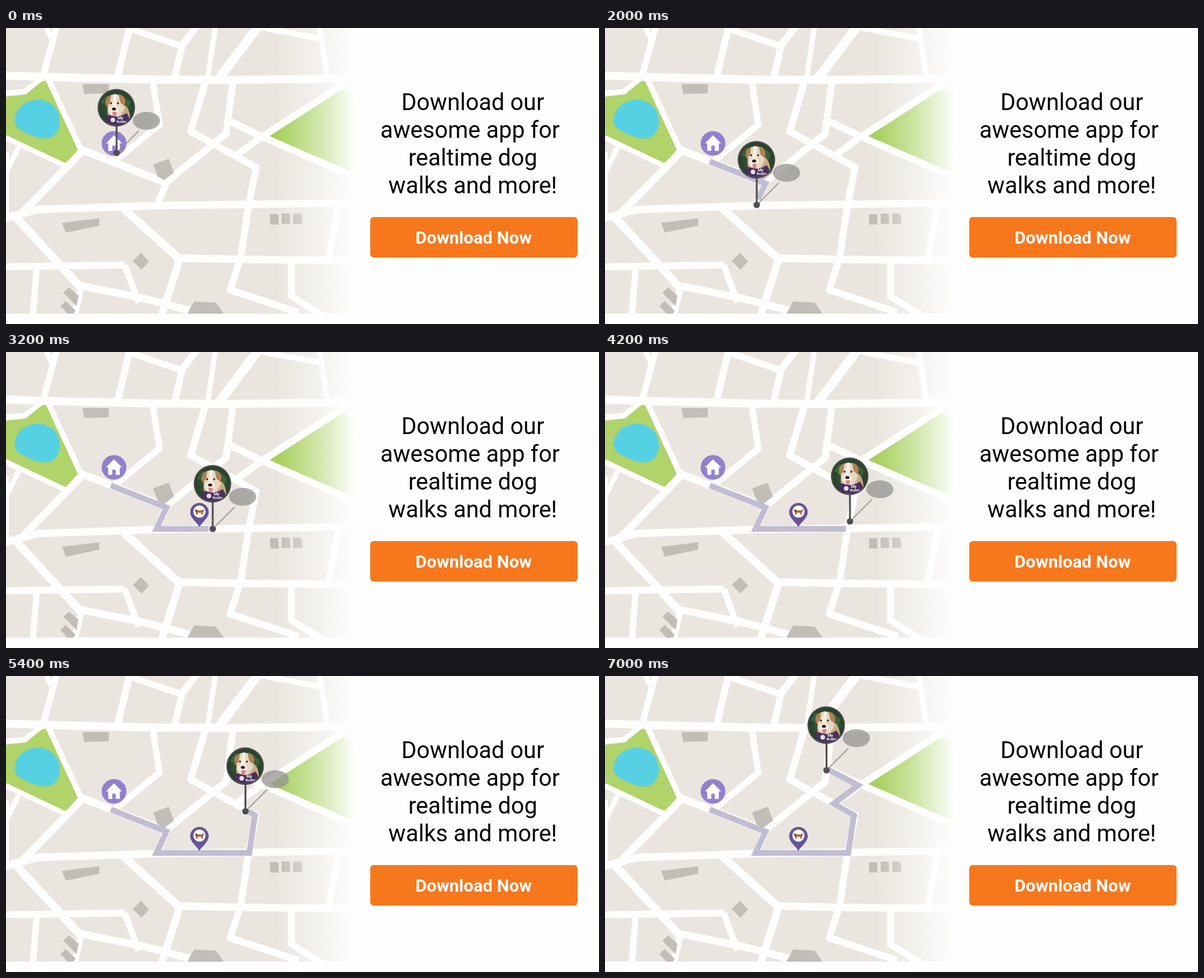
An HTML page for the animation above (7.2 s loop, 1024 by 512 pixels).

```html
<!DOCTYPE html>
<html lang="en">
<head>
<meta charset="utf-8">
<title>Dog walk map</title>
<style>
  html, body { margin: 0; width: 100%; height: 100%; overflow: hidden; background: #fefefe; }
  svg { display: block; width: 100vw; height: 100vh; }
  text { font-family: Roboto, Arial, sans-serif; text-anchor: middle; }
  .roads path { fill: none; stroke: #fefefe; stroke-linejoin: round; }
</style>
</head>
<body>
<svg viewBox="0 0 1024 512" xmlns="http://www.w3.org/2000/svg">
  <defs>
    <linearGradient id="fade" gradientUnits="userSpaceOnUse" x1="468" y1="0" x2="604" y2="0">
      <stop offset="0" stop-color="#fefefe" stop-opacity="0"/>
      <stop offset=".5" stop-color="#fefefe" stop-opacity=".46"/>
      <stop offset="1" stop-color="#fefefe"/>
    </linearGradient>
    <radialGradient id="leaves">
      <stop offset="0" stop-color="#4a6a3c"/>
      <stop offset="1" stop-color="#24402a"/>
    </radialGradient>
    <clipPath id="mapClip"><path d="M0 0H606V494H0Z"/></clipPath>
    <clipPath id="photoClip"><circle r="30"/></clipPath>
  </defs>
  <rect width="1024" height="512" fill="#fefefe"/>

  <g clip-path="url(#mapClip)">
    <rect width="606" height="494" fill="#eae6df"/>
    <path d="M0 119L35 115L62 91L74 92L125 209L104 235L0 185Z" fill="#b0d36a"/>
    <path d="M455 187L575 104L606 115V262Z" fill="#a6d05c"/>
    <path d="M54 124C76 123 93 140 93 160C93 180 82 191 68 191C54 191 38 184 25 176C14 170 12 157 19 144C26 131 40 124 54 124Z" fill="#56d1e3"/>
    <g class="roads" id="roads"></g>
    <g fill="#c1bdb7">
      <path d="M132 97H178L177 113L135 114Z"/>
      <path d="M254 236L281 226L290 250L273 263L262 257Z"/>
      <path d="M97 337L161 329V342L103 354Z"/>
      <path d="M219 403L233 389L247 404L234 418Z"/>
      <path d="M456 322H470L471 340H456ZM476 321H490L491 339H476ZM496 321H510L512 339H496Z"/>
      <path d="M99 458L109 449L125 463L122 481Z"/>
      <path d="M94 481L103 472L120 489L117 494H106Z"/>
      <path d="M313 494L325 473L362 475L376 494Z"/>
    </g>
    <rect x="460" width="146" height="494" fill="url(#fade)"/>
  </g>

  <path id="trail" d="M181 231L277 269L260 306H420L430 241L395 221L437 189L382 160" fill="none" stroke="#c0bdd3" stroke-width="10" stroke-miterlimit="6"/>

  <g transform="translate(186.5 199.5)">
    <circle r="21.3" fill="#9180d0"/>
    <path d="M0-14L14 0H10V13H3V4H-3V13H-10V0H-14Z" fill="#fff"/>
  </g>

  <g id="stop" transform="translate(334 277)">
    <path d="M0 26C-3 18-16 11-16 0A16 16 0 0 1 16 0C16 11 3 18 0 26Z" fill="#68529a"/>
    <circle r="10.5" cy="-1" fill="#fff"/>
    <path d="M-8-3L-6-5L-3-3H4L7-5L8-2L6 0V4H3V1H-3V4H-6V0Z" fill="#b06a35"/>
    <path d="M-6-4L-3-3L-4 0L-7-1Z" fill="#733f24"/>
  </g>

  <g id="pin">
    <g opacity=".76">
      <path d="M0 0L38-38" stroke="#8c8a89" stroke-width="2.2"/>
      <ellipse cx="51.5" cy="-55.5" rx="23.5" ry="15.5" fill="#969594"/>
    </g>
    <path d="M0 0V-48" stroke="#4f4f50" stroke-width="3.2"/>
    <circle r="5.6" fill="#4f4f50"/>
    <g transform="translate(-.5 -78)">
      <circle r="32.4" fill="#484a48"/>
      <g clip-path="url(#photoClip)">
        <circle r="30" fill="url(#leaves)"/>
        <path d="M-27-9L-18-22L-10-17L-18-4ZM15-18L25-10L20 2Z" fill="#3d6138"/>
        <path d="M8-8C20-5 25 7 24 30H-16L-15 5Z" fill="#c9ac82"/>
        <path d="M-15-16C-12-25 6-26 12-17L14 2L6 15L-7 17L-15 6Z" fill="#e5d8c1"/>
        <path d="M-9-22C-19-20-20-10-17-2L-11-8ZM4-23C15-22 18-12 14-3L7-9Z" fill="#ad8256"/>
        <path d="M-4-24L1-23L-1-4L-5-2L-7-6Z" fill="#f6efe2"/>
        <ellipse cx="-4" cy="4" rx="8" ry="8" fill="#f3ebdf"/>
        <circle cx="-9" cy="-8" r="1.7" fill="#35271d"/>
        <circle cx="3" cy="-8" r="1.7" fill="#35271d"/>
        <ellipse cx="-4" cy="2" rx="3.5" ry="2.6" fill="#241d1c"/>
        <path d="M-7 7H1L-1 14Q-4 17-6 13Z" fill="#df7e84"/>
        <path d="M-19 11L-7 14Q4 18 18 9L25 22L14 32H-15Z" fill="#49305f"/>
        <circle cx="-6" cy="21" r="4" fill="#e6ddea"/>
        <text x="7" y="20" font-size="7" font-weight="700" fill="#fff">My</text>
        <text x="9" y="26" font-size="6" font-weight="700" fill="#fff">Buddy</text>
      </g>
    </g>
  </g>

  <g font-size="40" fill="#050505">
    <text x="806" y="142">Download our</text>
    <text x="801.3" y="190">awesome app for</text>
    <text x="806" y="238">realtime dog</text>
    <text x="806" y="286">walks and more!</text>
  </g>
  <rect x="629" y="327" width="358" height="70" rx="6" fill="#f7771d"/>
  <text x="807.5" y="373" font-size="30" font-weight="700" fill="#fff">Download Now</text>
</svg>
<script>
  const LOOP = 7200, STEP = 200;
  const $ = id => document.getElementById(id);

  // Street centre lines, grouped by width.
  const streets = {
    9: "M68-5L82 25M362-5L348 88M-5 113L32 110L62 87M0 190L108 241M22 206L0 250",
    10: "M72 86L130 212M435-2L545 19M541-5L556 90M0 215V328M0 250V324",
    11: "M88-5L64 84M210 0L302 31M253 90L265 167L187 231M53 415L46 500M205 410L229 475M130 448L118 500",
    12: "M214-5L192 88M331-5L304 30L291 88M345 90L319 179L432 241L419 306L405 398L387 453L505 492M392 92L380 183L270 272M384 160L442 188L610 261M395 222L442 188L585 96M277 268L261 306M-5 413L205 410M493 402V464L550 500M575 303L557 402",
    13: "M132 213L20 328M126 209L277 268M-5 330L55 314L260 307L430 305L610 302M300 399L268 500M296 398L400 400L606 403M130 446L235 467L330 492",
    14: "M-5 82L80 85L250 89L390 90L610 87M203 312L301 401M14 324L132 452",
    16: "M438-6L367 88"
  };
  $("roads").innerHTML = Object.entries(streets)
    .map(([width, d]) => `<path d="${d}" stroke-width="${width}"/>`).join("");

  // step, foot x, foot y, length of trail behind it
  const keys = [
    [0, 191, 216, 0], [1, 191, 233, 5], [6, 269, 267, 93], [6.5, 275, 270, 100],
    [10, 262, 306, 133], [16, 357, 306, 234], [20, 420, 306, 294],
    [21, 423, 293, 300], [25, 430, 241, 366], [27, 413.5, 234, 384],
    [28.5, 395, 221, 410], [32, 437, 189, 463], [35, 382.5, 163, 523]
  ];

  function at(step) {
    const i = Math.max(1, keys.findIndex(k => k[0] >= step));
    const a = keys[i - 1], b = keys[i];
    const u = (step - a[0]) / (b[0] - a[0]);
    return a.map((v, j) => v + (b[j] - v) * u);
  }

  function draw(ms) {
    const step = Math.floor(ms % LOOP / STEP);
    const [, x, y, walked] = at(step);
    $("pin").setAttribute("transform", `translate(${x} ${y})`);
    $("trail").setAttribute("stroke-dasharray", `${walked} 1000`);
    $("trail").style.visibility = walked ? "visible" : "hidden";
    $("stop").style.visibility = step >= 15 ? "visible" : "hidden";
  }

  const start = performance.now();
  function tick() {
    draw(performance.now() - start);
    requestAnimationFrame(tick);
  }
  draw(0);
  requestAnimationFrame(tick);
</script>
</body>
</html>
```
